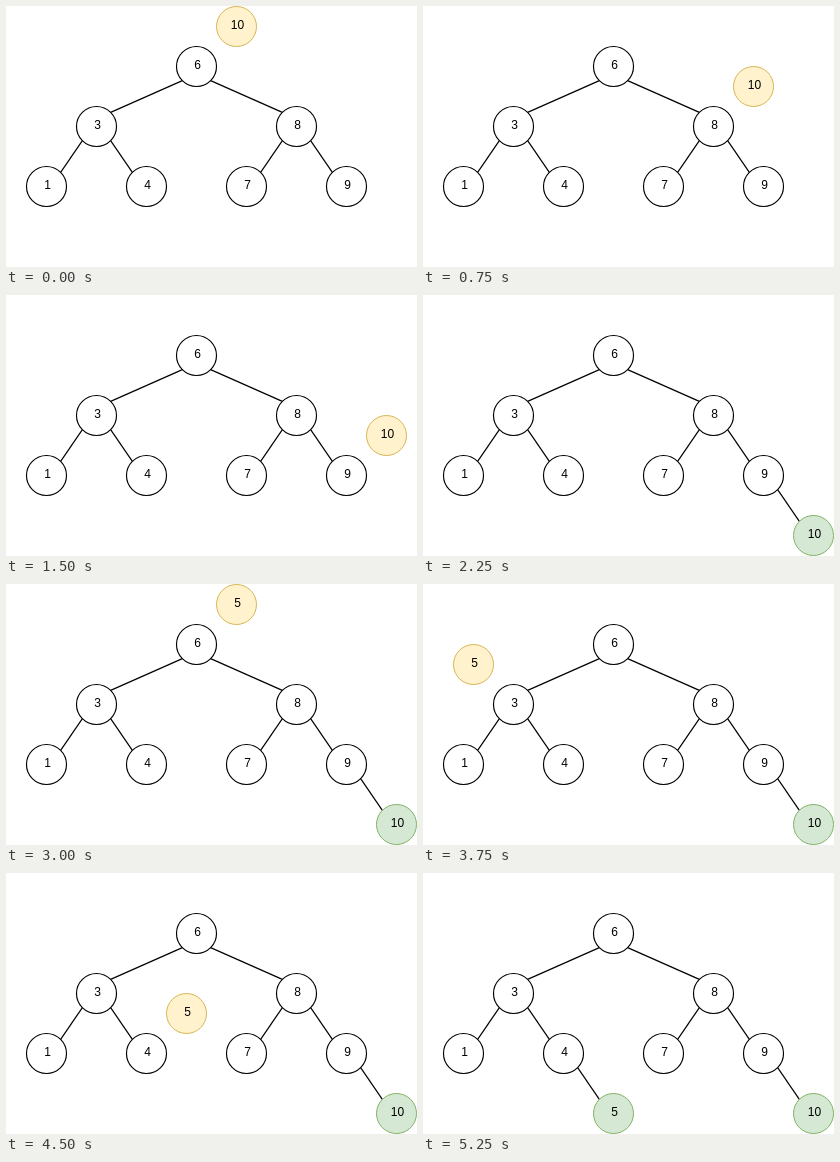
Recreate the animation shown at these times as an HTML page. Size 411 px wide and 261 px high, loop 6.75 s.

```html
<!DOCTYPE html>
<html lang="en">
<head>
<meta charset="utf-8">
<title>Binary search tree insertion</title>
<style>
  html, body { margin: 0; width: 100%; height: 100%; overflow: hidden; background: #fff; }
  svg { display: block; }
  text { font: 12px "Liberation Sans", Arial, sans-serif; text-anchor: middle; }
  .edge { stroke: #000; stroke-width: 1.2; }
  .plain { fill: #fff; stroke: #000; stroke-width: 1.15; }
  .moving { fill: #fff2cc; stroke: #d6b656; }
  .placed { fill: #d5e8d4; stroke: #82b366; }
</style>
</head>
<body>
<svg id="stage" width="411" height="261" viewBox="0 0 411 261"></svg>
<script>
const stage = document.getElementById("stage");
const LOOP = 6750, STEP = 750, R = 20, LEVEL = 60, HOVER = 40;

// Walks down the tree, adds the value and returns the nodes it was compared with.
function insert(nodes, value) {
  const path = [];
  let node = nodes[0], side = 1;
  while (node) {
    path.push(node);
    side = value < node.value ? -1 : 1;
    node = node[side];
  }
  const parent = path.at(-1);
  const added = parent
    ? { value, parent, side, x: parent.x + side * (path.length > 1 ? 50 : 100), y: parent.y + LEVEL }
    : { value, side, x: 190, y: 60 };
  if (parent) parent[side] = added;
  nodes.push(added);
  return path;
}

function circle({ value, x, y }, kind) {
  return `<circle class="${kind}" cx="${x + .5}" cy="${y + .5}" r="${R}"/>
    <text x="${x + 1.5}" y="${y + 3}">${value}</text>`;
}

// Edges leave and enter the circles on their diagonals.
function edge({ parent, side, x, y }) {
  const d = R * Math.SQRT1_2;
  return `<path class="edge" d="M${parent.x + side * d + .5} ${parent.y + d + .5}L${x - side * d + .5} ${y - d + .5}"/>`;
}

function draw(step) {
  const nodes = [], start = [6, 3, 8, 1, 4, 7, 9];
  let moving = "";
  for (const value of start) insert(nodes, value);
  for (const value of [10, 5]) {
    if (step < 0) break;
    const at = insert(nodes, value)[step];
    if (at) {
      nodes.pop();
      moving = circle({ value, x: at.x + at.side * HOVER, y: at.y - HOVER }, "moving");
    }
    step -= 4;
  }
  stage.innerHTML = nodes.slice(1).map(edge).join("")
    + nodes.map((node, i) => circle(node, i < start.length ? "plain" : "placed")).join("")
    + moving;
}

let shown = -1;
function tick() {
  const step = Math.floor(performance.now() % LOOP / STEP);
  if (step !== shown) draw(shown = step);
  requestAnimationFrame(tick);
}
tick();
</script>
</body>
</html>
```
